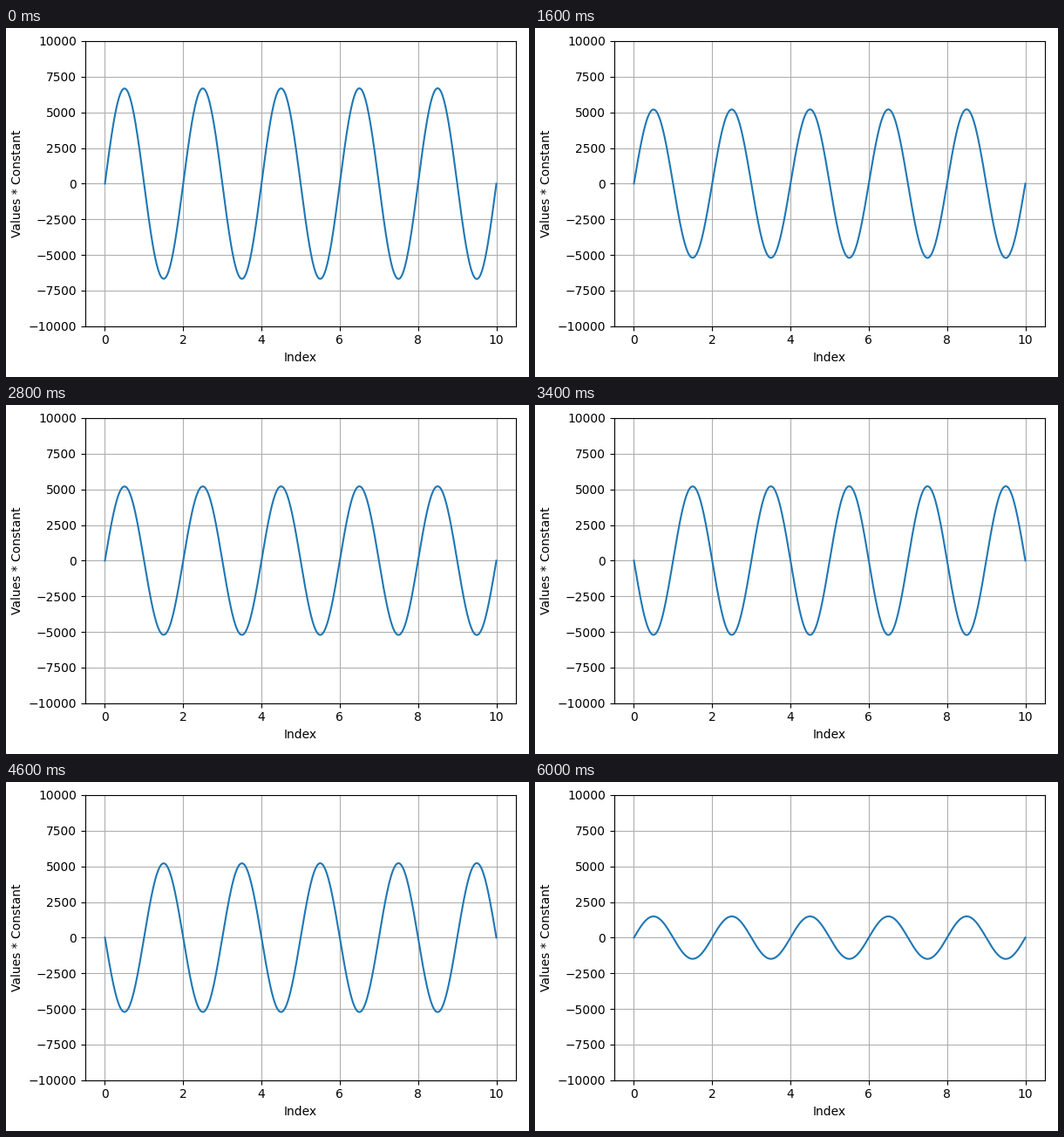
Animation of 600 by 400 pixels, one loop 6.2 s. Source, as a matplotlib script:

```python
import numpy as np
import matplotlib.pyplot as plt
from matplotlib.animation import FuncAnimation

FRAMES = 31
INTERVAL = 200   # ms
PEAK = 7010
PHASE = np.radians(-17.8)

x = np.linspace(0, 10, 1000)


def wave(step):
    """Standing wave, six steps per swing, with a slight growth."""
    swing = PEAK * np.cos(step * np.pi / 3 + PHASE)
    growth = 1 + 0.00015 * step + 0.0003 * x
    return swing * growth * np.sin(np.pi * x)


plt.rcParams["font.family"] = "DejaVu Sans"
fig, ax = plt.subplots(figsize=(6, 4), dpi=100)
line, = ax.plot(x, wave(0))
ax.set_xlabel("Index")
ax.set_ylabel("Values * Constant")
ax.grid(True)
# The layout is fitted to the data before the wider limits are set.
fig.tight_layout()
ax.set_ylim(-10000, 10000)


def update(frame):
    # The first pose is held for two ticks.
    line.set_ydata(wave(max(frame - 1, 0)))
    return line,


anim = FuncAnimation(fig, update, frames=FRAMES, interval=INTERVAL,
                     repeat=True, repeat_delay=0)
plt.show()
```
